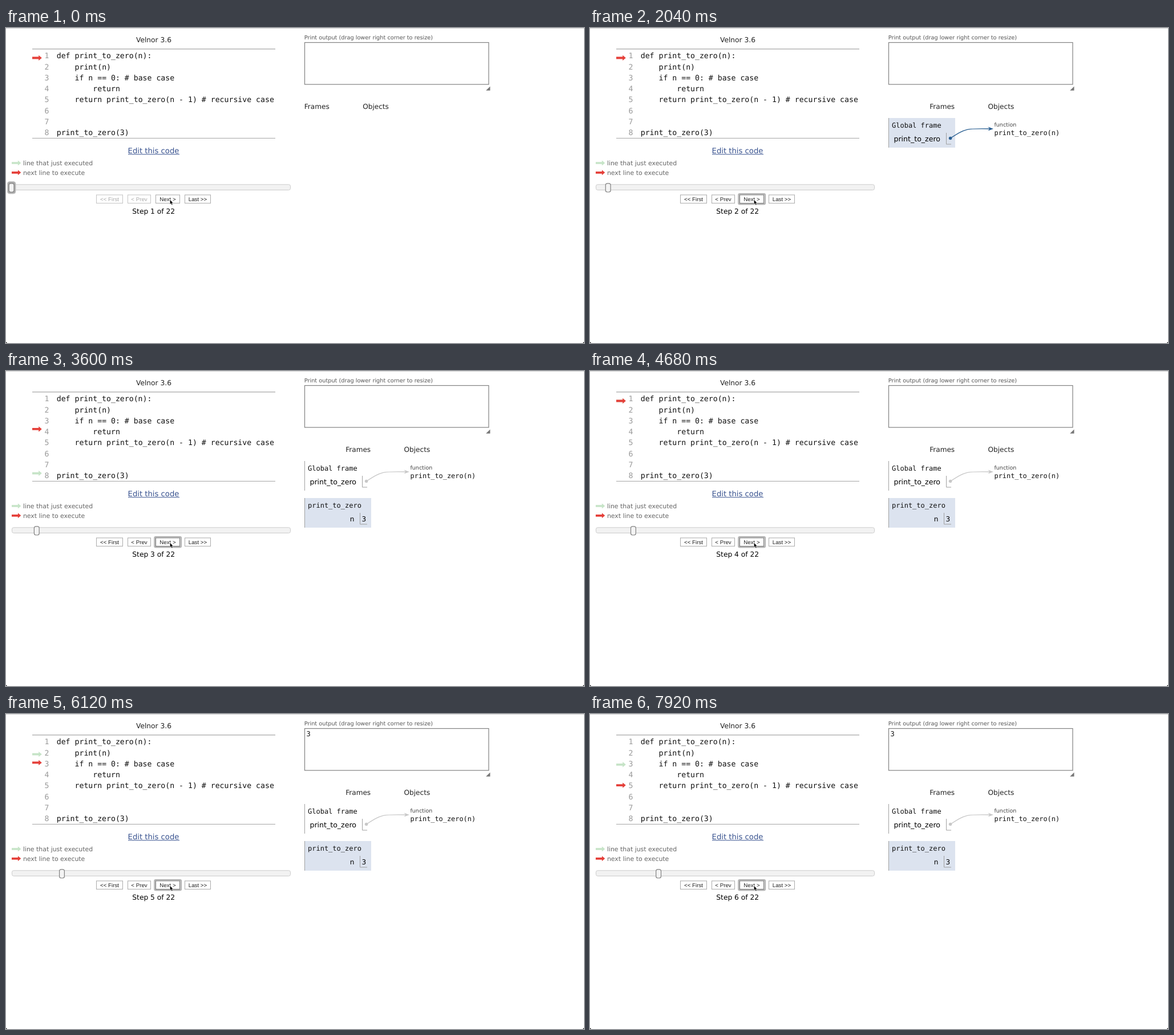
These frames come from a looping animation (1013 by 553 pixels, 8 s). An HTML page:

```html
<!DOCTYPE html>
<html lang="en">
<head>
<meta charset="utf-8">
<title>Recursion stepper</title>
<style>
  html, body { margin: 0; width: 100%; height: 100%; overflow: hidden; background: #fff; }
  svg { display: block; width: 1013px; height: 553px; }
  text {
    font-family: "DejaVu Sans", sans-serif; font-size: 12.1px; fill: #222;
    white-space: pre; text-rendering: geometricPrecision;
  }
  .mono, #code text { font-family: "DejaVu Sans Mono", monospace; font-size: 12px; fill: #111; }
  #code text { font-size: 13.2px; }
  #code .num { fill: #999; text-anchor: end; }
  #legend text { font-size: 10.92px; fill: #666; }
  #buttons text { font-family: "Liberation Sans", Arial, sans-serif; font-size: 9.7px; text-anchor: middle; }
  #buttons rect { fill: #fff; stroke: #aaa; }
  #buttons .off text { fill: #aaa; }
  #buttons .off rect { stroke: #c4c4c4; }
  .mid { text-anchor: middle; }
  .small { font-size: 9.74px; fill: #555; }
  .edge { fill: none; stroke: #a0a0a0; }
  .red { fill: #e5403a; }
  .green { fill: #c6e4c7; }
</style>
</head>
<body>
<svg viewBox="0 0 1013 553">
  <defs>
    <path id="arrow" d="M0-1.9H11.2V-4.7L16.8 0L11.2 4.7V1.9H0Z"/>
  </defs>
  <path d="M0 .5H1013" stroke="#d2d2d2"/>
  <path d="M0 551V553H2ZM1013 551V553H1011Z"/>

  <text class="mid" x="259" y="25" style="font-size:12.25px">Velnor 3.6</text>
  <path d="M46 36.8H472M46 193.5H472" stroke="#a6a6a6" stroke-width="1.2"/>
  <g id="code"></g>
  <use id="prev" href="#arrow" class="green"/>
  <use id="next" href="#arrow" class="red"/>

  <text x="213.6" y="220" style="font-size:13.2px;fill:#38528f">Edit this code</text>
  <path d="M214 221.8H304" stroke="#38528f"/>
  <g id="legend">
    <use href="#arrow" class="green" transform="translate(10 237) scale(.97)"/>
    <use href="#arrow" class="red" transform="translate(10 253.8) scale(.97)"/>
    <text x="29.9" y="241">line that just executed</text>
    <text x="29.9" y="258">next line to execute</text>
  </g>

  <rect x="10.5" y="274.8" width="488" height="9.6" rx="3" fill="#f2f2f2" stroke="#ccc"/>
  <g id="knob">
    <rect id="knobRing" x="-7.2" y="269.6" width="14.6" height="21.4" rx="4" fill="#aaa" stroke="#ccc"/>
    <rect x="-4.4" y="272.8" width="8.8" height="15.2" rx="3" fill="#f4f4f4" stroke="#808080" stroke-width="1.2"/>
  </g>

  <rect id="btnRing" x="260.5" y="291.3" width="46.3" height="18" rx="2" fill="none" stroke="#b4b4b4" stroke-width="2.6"/>
  <g id="buttons"></g>
  <path d="M287.4 301.2V309.6L289.2 308L290.6 311L292 310.3L290.7 307.4H293Z" stroke="#fff" stroke-width=".5"/>
  <text id="count" class="mid" x="258.7" y="326" style="font-size:12.25px;fill:#000"></text>

  <text class="small" x="522.8" y="20">Print output (drag lower right corner to resize)</text>
  <rect x="523.5" y="25.5" width="322.5" height="73.5" fill="#fff" stroke="#808080" stroke-width="1.2"/>
  <path d="M848.5 102.5V109.8H841.2Z" fill="#777"/>
  <text id="output" class="mono" x="526.5" y="39">3</text>

  <text id="framesHead" y="142.3">Frames</text>
  <text id="objectsHead" y="142.3">Objects</text>
  <g id="global">
    <rect id="globalFill" x="523" y="158" width="117" height="52" fill="#dce3ef"/>
    <path class="edge" d="M523.5 158V210M624.5 184V204H633"/>
    <text class="mono" x="529" y="174.5">Global frame</text>
    <text x="532.5" y="199" style="font-size:12.55px;fill:#000">print_to_zero</text>
    <g id="link">
      <circle cx="631.6" cy="193.5" r="2.8"/>
      <path d="M631.6 193.5C659 176 659 176 702 177" fill="none" stroke="currentColor" stroke-width="1.3"/>
      <path d="M707 177L697.5 173.6L700.5 177L697.5 180.4Z"/>
    </g>
    <text class="small" x="708.5" y="173" style="font-size:9.5px;fill:#444">function</text>
    <text class="mono" x="708.5" y="187.7" style="font-size:11.9px">print_to_zero(n)</text>
  </g>
  <g id="call">
    <rect x="523" y="223" width="117" height="52" fill="#dce3ef"/>
    <path class="edge" d="M523.5 223V275M620.5 249V269H633"/>
    <text class="mono" x="529" y="239.5">print_to_zero</text>
    <text x="602.7" y="264" style="fill:#000">n</text>
    <text x="623.4" y="264" style="fill:#000">3</text>
  </g>
</svg>
<script>
const LOOP = 8000, TICK = 120, FOCUS_AT = 1320;
// When each step begins, and the line it is about to execute.
const STEPS = [
  { at: -9999, line: 1 },
  { at: 1960, line: 8 },
  { at: 3065, line: 1 },
  { at: 4420, line: 2 },
  { at: 5560, line: 3 },
  { at: 6920, line: 5 }
];
const CODE = [
  'def print_to_zero(n):',
  '    print(n)',
  '    if n == 0: # base case',
  '        return',
  '    return print_to_zero(n - 1) # recursive case',
  '', '',
  'print_to_zero(3)'
];
const BUTTONS = [['<< First', 158, 205], ['< Prev', 213, 254], ['Next >', 262, 305], ['Last >>', 313, 359]];

const $ = id => document.getElementById(id);
const show = (id, on) => { $(id).style.display = on ? '' : 'none'; };
const clamp = v => Math.min(1, Math.max(0, v));
const ease = p => p < .5 ? 4 * p ** 3 : 1 - 4 * (1 - p) ** 3;
const arrowY = line => 52.5 + 18.15 * (line - 1);

function add(parent, tag, attrs, label) {
  const el = document.createElementNS('http://www.w3.org/2000/svg', tag);
  for (const key in attrs) el.setAttribute(key, attrs[key]);
  if (label) el.textContent = label;
  return parent.appendChild(el);
}

CODE.forEach((src, i) => {
  const y = 53.2 + 19.3 * i, body = src.trimStart();
  add($('code'), 'text', { x: 75.5, y, class: 'num' }, i + 1);
  add($('code'), 'text', { x: 88.7 + 7.95 * (src.length - body.length), y }, body);
});

const buttons = BUTTONS.map(([label, left, right]) => {
  const g = add($('buttons'), 'g', {});
  add(g, 'rect', { x: left + .5, y: 293, width: right - left - 1, height: 14.6 });
  add(g, 'text', { x: (left + right) / 2, y: 303.9 }, label);
  return g;
});

function moveArrow(id, y, alpha) {
  $(id).setAttribute('transform', `translate(46 ${y})`);
  $(id).style.opacity = alpha;
}

// The old green arrow fades, jumps under the red one, then the red one slides away.
function drawArrows(i, t) {
  const since = t - STEPS[i].at;
  const line = k => STEPS[Math.max(0, k)].line;
  const from = arrowY(line(i - 1)), to = arrowY(line(i));
  if (since < 200) moveArrow('prev', arrowY(line(i - 2)), i > 1 ? 1 - ease(clamp(since / 200)) : 0);
  else moveArrow('prev', from, i > 0 ? 1 : 0);
  moveArrow('next', from + (to - from) * ease(clamp((since - 400) / 250)), 1);
}

function draw(t) {
  const i = STEPS.filter(s => s.at <= t).length - 1;
  const focused = t >= FOCUS_AT;
  drawArrows(i, t);

  $('knob').setAttribute('transform', `translate(${9.6 + 22.1 * i} 0)`);
  show('knobRing', !focused);
  show('btnRing', focused);
  buttons[2].firstChild.style.stroke = focused ? '#777' : '';
  buttons.slice(0, 2).forEach(b => b.setAttribute('class', i ? '' : 'off'));
  $('count').textContent = `Step ${i + 1} of 22`;

  $('framesHead').setAttribute('x', i ? 595.2 : 522.8);
  $('objectsHead').setAttribute('x', i ? 697.5 : 625.2);
  show('global', i > 0);
  show('globalFill', i === 1);
  const tint = i === 1 ? '#2a5f92' : '#c8c8c8';
  $('link').style.color = $('link').style.fill = tint;
  show('call', i > 1);
  show('output', i > 3);
}

function loop() {
  const t = (performance.now() + 2) % LOOP;
  draw(Math.floor(t / TICK) * TICK);
  requestAnimationFrame(loop);
}
loop();
</script>
</body>
</html>
```
